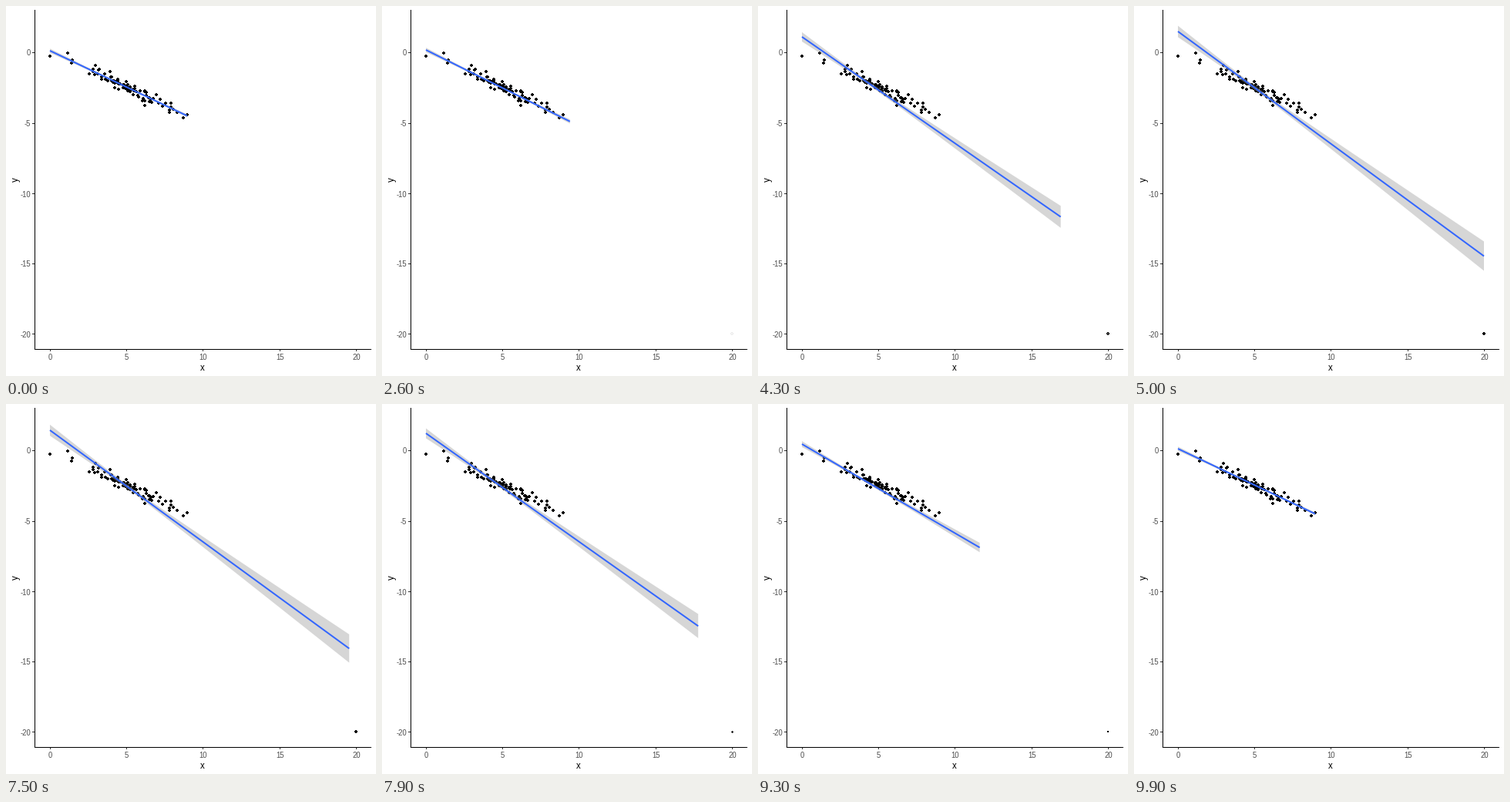
Write a matplotlib script that moves like this. It is 480 px wide and 480 px high and loops after 10000 ms.

```python
import numpy as np
import matplotlib.pyplot as plt
from matplotlib.animation import FuncAnimation
from matplotlib.collections import PolyCollection
from matplotlib.patches import Polygon

SIZE, DPI = 480, 80
PX = 72 / DPI                      # one pixel in points
FRAMES, STEP = 100, 100
ENTER, EXIT, SPAN = 25, 74, 25     # last still frame before each move, its length
X0, XU, YU = 57, 19.85, 18.24      # pixel of x = 0, pixels per unit
OUTLIER = (454, 425)

plt.rcParams["font.family"] = "Liberation Sans"
fig = plt.figure(figsize=(SIZE / DPI, SIZE / DPI), dpi=DPI, facecolor="white")
ax = fig.add_axes([0, 0, 1, 1])
ax.set(xlim=(0, SIZE), ylim=(SIZE, 0))
ax.axis("off")


def stepped(cx, cy, arm, reach):
    """Pixel disc: a square of half-size reach with its corners cut."""
    quarter = np.array([(arm, -reach), (arm, -arm), (reach, -arm)])
    turn = np.array([(0, 1), (-1, 0)])
    turns = [np.linalg.matrix_power(turn, k) for k in range(4)]
    return np.vstack([quarter @ t for t in turns]) + (cx, cy)


def rule(xs, ys, color):
    ax.plot(xs, ys, color=color, lw=PX, solid_capstyle="butt", snap=False)


def label(x, y, text, size, color="#4d4d4d", **kw):
    ax.text(x, y, text, fontsize=size * PX, color=color, **kw)


# axes
for k in range(5):
    tx = np.floor(57.2 + 99.3 * k) + 0.5
    ty = np.floor(60.9 + 91.2 * k) + 0.5
    rule([tx, tx], [446, 448], "#333333")
    rule([34, 37], [ty, ty], "#333333")
    label(tx, 459, str(5 * k), 9.5, ha="center", va="baseline")
    label(32, ty + 4, str(-5 * k), 9.5, ha="right", va="baseline")
rule([37.5, 37.5], [5, 446], "black")
rule([37, 474], [445.5, 445.5], "black")
label(255, 473, "x", 11.5, "black", ha="center", va="baseline")
label(12.5, 225, "y", 11.5, "black", ha="center", va="center", rotation=90)

# scatter: the tails by hand, the cloud as noise around the trend
tails = [(57, 65), (80, 61), (86, 70), (85, 74), (116, 77), (135, 85),
         (180, 129), (214, 126), (214, 131), (222, 138), (230, 145),
         (235, 141)]
rng = np.random.default_rng(4)
cloud_x = np.clip(rng.normal(161, 25, 80), 96, 227)
cloud_y = 58 + 0.472 * (cloud_x - X0) + np.clip(rng.normal(0, 4.2, 80), -8, 8)
cloud = np.round(np.column_stack([cloud_x, cloud_y]))
dots = [stepped(x, y, 1, 2) for x, y in [*tails, *cloud]]
ax.add_collection(PolyCollection(dots, facecolors="black", linewidths=0,
                                 antialiaseds=False, zorder=3))


def fit(x_end, y_start, y_end, n, mean, sxx, spread):
    """Regression line in pixels with its confidence half-width."""
    x = np.linspace(0, x_end, 80)
    y = np.linspace(y_start, y_end, 80)
    half = spread * YU * np.sqrt(1 / n + (x - mean) ** 2 / sxx)
    return np.array([X0 + XU * x, y, half])


without = fit(8.97, 58, 142.5, 100, 5.2, 300, 0.47)
with_outlier = fit(20, 33, 324.5, 101, 5.3, 510, 1.585)

band = ax.add_patch(Polygon([(0, 0)] * 3, facecolor="#999999", alpha=0.4,
                            lw=0, zorder=4))
line, = ax.plot([], [], color="#3366ff", lw=2 * PX, solid_capstyle="butt",
                zorder=5)
disc, centre = [ax.add_patch(Polygon(stepped(*OUTLIER, 1, r), lw=0,
                                     antialiased=False, zorder=3))
                for r in (2, 1)]


def show_outlier(enter, leave):
    visible = enter > 0 and leave < 1
    disc.set_visible(visible)
    centre.set_visible(visible and leave == 0)
    # fill and outline fade together, so the rim is twice as dense
    disc.set_facecolor(str((1 - enter) ** 2))
    centre.set_facecolor(str(1 - enter))
    x, y = OUTLIER
    if leave < 0.12:
        disc.set_xy(stepped(x, y, 1, 2))
    elif leave < 0.42:
        disc.set_xy(stepped(x + 0.5, y + 0.5, 0.5, 1.5))
    else:
        disc.set_xy(stepped(x, y, 1, 1))


def draw(i):
    enter = float(np.clip((i - ENTER) / SPAN, 0, 1))
    leave = float(np.clip((i - EXIT) / SPAN, 0, 1))
    x, y, half = without + (with_outlier - without) * (enter - leave)
    line.set_data(x, y)
    upper = np.column_stack([x, y - half])
    lower = np.column_stack([x, y + half])
    band.set_xy(np.vstack([upper, lower[::-1]]))
    show_outlier(enter, leave)
    return band, line, disc, centre


anim = FuncAnimation(fig, draw, frames=FRAMES, interval=STEP,
                     init_func=lambda: draw(0), repeat=True, repeat_delay=0)
plt.show()
```
